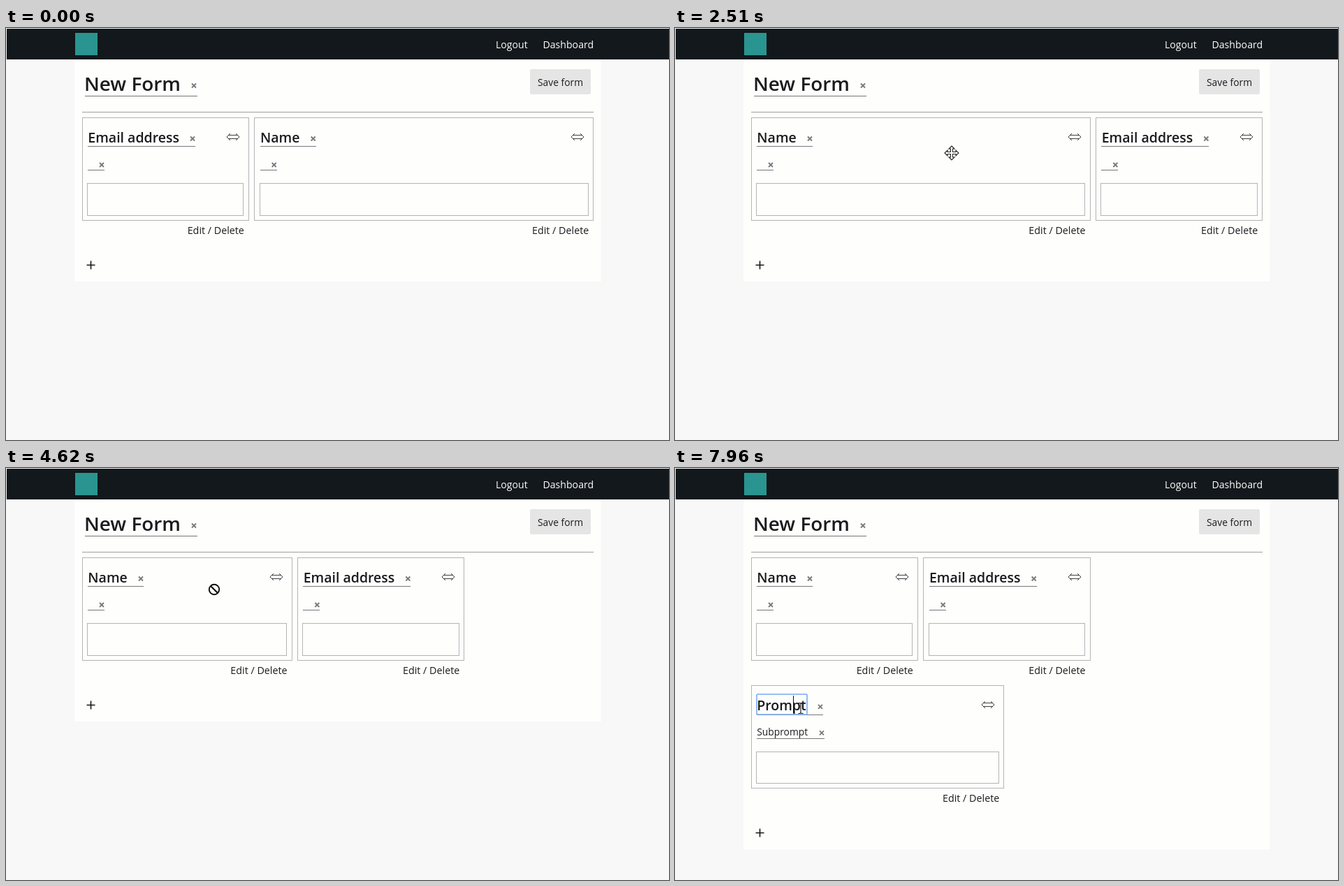
Animation, 949 px wide and 590 px high, one loop 8000 ms. Source, as an HTML page:

```html
<!DOCTYPE html>
<html lang="en">
<head>
<meta charset="utf-8">
<title>Form builder</title>
<style>
html, body { margin: 0; width: 100%; height: 100%; overflow: hidden; background: #f8f8f8; }
svg { display: block; width: 949px; height: 590px; font-family: "Open Sans", "Noto Sans", sans-serif; }
text { fill: #1b1b1f; white-space: pre; }
.h1 { font-size: 27.9px; font-weight: 600; }
.h2 { font-size: 19.5px; font-weight: 600; }
.small { font-size: 13.8px; }
.link { font-size: 14.3px; font-weight: 500; }
.nav { font-size: 14.1px; fill: #fff; }
.box { fill: none; stroke: #b4b4b6; }
.rule { fill: none; stroke: #77777b; }
.cross { fill: none; stroke: #7a7a7e; stroke-width: 1.9; }
.icon { fill: none; stroke: #2a2a2d; stroke-width: .9; }
.plus { fill: none; stroke: #151518; stroke-width: 1.6; }
</style>
</head>
<body>
<svg viewBox="0 0 949 590">
  <defs>
    <radialGradient id="fade" gradientUnits="userSpaceOnUse" cx="623" cy="193" r="350">
      <stop offset="0" stop-color="#fff" stop-opacity=".3"/>
      <stop offset="1" stop-color="#fff" stop-opacity="0"/>
    </radialGradient>
    <mask id="halo" maskUnits="userSpaceOnUse" x="340" y="120" width="520" height="150">
      <rect x="340" y="128" width="520" height="136" fill="url(#fade)"/>
    </mask>
  </defs>
  <rect width="949" height="590" fill="#f8f8f8"/>
  <rect x="1" y="1" width="948" height="44" fill="#12181b"/>
  <rect x="99" y="7" width="32" height="32" fill="#2a9490"/>
  <text class="nav" x="701" y="28.5">Logout</text>
  <text class="nav" x="768.5" y="28.5">Dashboard</text>
  <rect id="sheet" x="98" y="45" width="754" fill="#fefefd"/>
  <text class="h1" x="112" y="90">New Form</text>
  <path class="rule" d="M113 97.5H274"/>
  <path class="cross" d="M266 79.5l6 6m0-6l-6 6"/>
  <rect x="750" y="59" width="87" height="36" rx="2" fill="#e5e5e5"/>
  <text class="small" x="793.5" y="82.5" text-anchor="middle">Save form</text>
  <path d="M109 120.5H841" stroke="#a0a0a2"/>
  <g id="fields"></g>
  <path id="plus" class="plus" d="M-6 0H6M0-6V6"/>
  <g id="focus">
    <rect x="117" y="324" width="72" height="29" rx="1" fill="none" stroke="#78aaf0" stroke-width="1.6"/>
    <path d="M169.5 326V351" stroke="#111"/>
  </g>
  <g id="ghost" mask="url(#halo)"></g>
  <g id="cursor"></g>
</svg>
<script>
const LOOP = 8000, LEFT = 108.6, PITCH = 61.67, GAP = 7.4, ROW = 183.3, GRAB = [623, 193];
const $ = id => document.getElementById(id);

// Underline width of each label
const widths = { "Email address": 154, Name: 80, Prompt: 95, Subprompt: 97, "": 24 };

const cross = (x, y) => `<path class="cross" d="M${x - 3} ${y - 3}l6 6m0-6l-6 6"/>`;

// Rectangle whose one-pixel border is snapped to whole pixels
function box(x1, y1, x2, y2) {
  const [l, t, r, b] = [x1, y1, x2, y2].map(Math.round);
  return `<rect class="box" x="${l + 0.5}" y="${t + 0.5}" width="${r - l - 1}" height="${b - t - 1}"/>`;
}

function editable(cls, label, x, base, line, mid) {
  const w = widths[label];
  return `<text class="${cls}" x="${x + 0.3}" y="${base}">${label}</text>
    <path class="rule" d="M${Math.round(x)} ${Math.round(line) + 0.5}h${w}"/>${cross(x + w - 4, mid)}`;
}

function field(label, sub, col, span, row = 0) {
  const x = LEFT + PITCH * col, r = x + PITCH * span - GAP, dy = row * ROW;
  return box(x, 128 + dy, r, 276 + dy) +
    editable("h2", label, x + 8.4, 164 + dy, 169.3 + dy, 158.5 + dy) +
    editable("small", sub, x + 8.4, 200 + dy, 203.3 + dy, 196 + dy) +
    box(x + GAP, 222.4 + dy, r - GAP, 269 + dy) +
    `<path class="icon" transform="translate(${Math.round(r) - 23} ${Math.round(156 + dy)})"
      d="M-4-5L-9 0L-4 5M4-5L9 0L4 5M-6.5-2.5H6.5M-6.5 2.5H6.5"/>
    <text class="link" x="${r - 7}" y="${295 + dy}" text-anchor="end">Edit / Delete</text>`;
}

const nameFirst = span => field("Name", "", 0, span) + field("Email address", "", span, 4);

// [start, rows, markup]
const layouts = [
  [0, 1, field("Email address", "", 0, 4) + field("Name", "", 4, 8)],
  [1930, 1, nameFirst(8)],
  [4100, 1, nameFirst(5)],
  [4790, 1, nameFirst(4)],
  [6000, 2, nameFirst(4) + field("Prompt", "Subprompt", 0, 6, 1)]
];

const pointer = "M0 0V15.5L3.6 12.2L6.1 18L8.6 17L6.1 11.4H11Z";
const outline = d => `<path d="${d}" fill="#fff" stroke="#222" stroke-width="1.1"/>`;
const shapes = {
  none: "",
  arrow: outline(pointer),
  drag: outline(pointer) +
    `<rect x="2.5" y="14.5" width="10" height="7" fill="#fff" stroke="#222" stroke-dasharray="1.5 1"/>`,
  move: outline("M0-10L4-6H1.5V-1.5H6V-4L10 0L6 4V1.5H1.5V6H4L0 10L-4 6H-1.5V1.5H-6V4L-10 0L-6-4V-1.5H-1.5V-6H-4Z"),
  resize: outline("M-11 0L-6-4.5V-1.5H6V-4.5L11 0L6 4.5V1.5H-6V4.5Z"),
  deny: `<circle r="7.2" fill="#fff" stroke="#111" stroke-width="2"/>
    <path d="M-5-5L5 5" stroke="#111" stroke-width="2.2"/>`,
  hand: outline("M-1.5 1Q0-1 1.5 1V7Q3 5.5 4.5 7Q6 6 7.3 7.5Q9.5 7 10 9V14L8 19.5H0L-5.5 12Q-6 9.5-3.5 10L-1.5 12Z"),
  text: `<path d="M-3.5-7.5H-1L0-6.5L1-7.5H3.5M-3.5 7.5H-1L0 6.5L1 7.5H3.5M0-6.5V6.5"
    fill="none" stroke="#222" stroke-width="1.2"/>`
};

// [time, x, y, shape]
const track = [
  [0, 868, 215, "none"], [550, 868, 215, "arrow"], [610, 838, 210, "move"],
  [880, 660, 196, "move"], [980, 623, 193, "drag"], [1270, 525, 192, "drag"],
  [1340, 470, 190, "drag"], [1370, 462, 190, "drag"], [1720, 275, 186, "drag"],
  [1930, 275, 186, "move"], [2510, 395, 179, "move"], [2720, 566, 169, "move"],
  [2750, 572, 165, "move"], [2790, 577, 160, "resize"], [3370, 577, 160, "deny"],
  [3680, 492, 163, "deny"], [4090, 392, 165, "deny"], [4100, 391, 164, "resize"],
  [4170, 387, 160, "resize"], [4200, 387, 160, "deny"], [4620, 298, 174, "deny"],
  [4760, 290, 173, "deny"], [4790, 290, 173, "move"], [5030, 290, 173, "move"],
  [5270, 222, 276, "arrow"], [5540, 127, 350, "hand"], [5650, 122, 342, "hand"],
  [6000, 122, 342, "move"], [6240, 116, 357, "move"], [6510, 156, 350, "move"],
  [6680, 156, 350, "move"], [6740, 163, 347, "text"], [6790, 165, 346, "text"],
  [7000, 165, 346, "text"], [7100, 166, 344, "text"], [7720, 166, 344, "text"],
  [7960, 180, 344, "text"], [LOOP, 180, 344, "text"]
];

const show = (el, on) => el.setAttribute("visibility", on ? "visible" : "hidden");
const place = (el, x, y) => el.setAttribute("transform", `translate(${x} ${y})`);

function cursorAt(t) {
  const i = track.findLastIndex(k => k[0] <= t);
  const a = track[i], b = track[i + 1] || a;
  const p = (t - a[0]) / (b[0] - a[0] || 1);
  return [a[1] + (b[1] - a[1]) * p, a[2] + (b[2] - a[2]) * p, a[3]];
}

let layout, shape;

function render(t) {
  const next = layouts.findLast(l => l[0] <= t);
  if (next !== layout) {
    layout = next;
    const drop = Math.round((layout[1] - 1) * ROW);
    $("fields").innerHTML = layout[2];
    $("sheet").setAttribute("height", 318 + drop);
    place($("plus"), 121.5, 339.5 + drop);
  }
  const [x, y, kind] = cursorAt(t);
  if (kind !== shape) {
    shape = kind;
    $("cursor").innerHTML = shapes[kind];
  }
  place($("cursor"), Math.round(x), Math.round(y));
  place($("ghost"), Math.round(x - GRAB[0]), Math.round(y - GRAB[1]));
  show($("ghost"), kind === "drag");
  show($("focus"), t >= 7440);
}

$("ghost").innerHTML = `<rect x="355" y="128" width="486" height="148" fill="#fafaff"/>` +
  field("Name", "", 4, 8);

const start = performance.now();
function tick() {
  render((performance.now() - start) % LOOP);
  requestAnimationFrame(tick);
}
tick();
</script>
</body>
</html>
```
